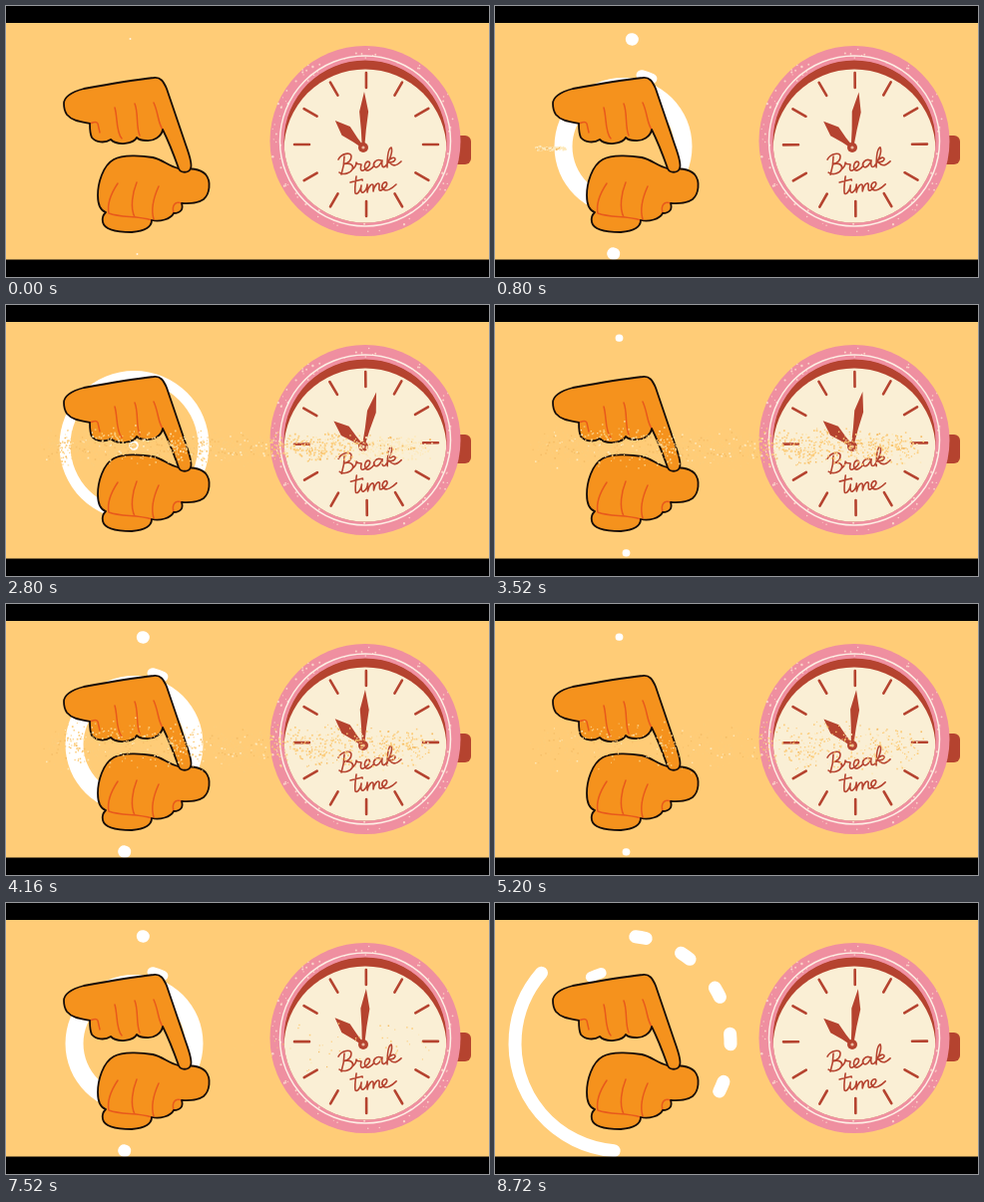
An HTML page with a canvas that plays this animation: 484x272 px, repeating every 8800 ms.

```html
<!DOCTYPE html>
<html lang="en">
<head>
<meta charset="utf-8">
<title>Break time</title>
<style>
html, body { margin: 0; width: 100%; height: 100%; overflow: hidden; background: #000; }
canvas { display: block; width: 484px; height: 272px; }
</style>
</head>
<body>
<canvas id="stage" width="484" height="272" role="img" aria-label="Break time"></canvas>
<script>
const ctx = document.getElementById('stage').getContext('2d');
const LOOP = 8800, STEP = 80, RING = 21, TAP = 750;
const BG = '#ffcc77', ORANGE = '#f5921d', INK = '#170d08', CREASE = '#e8591c';
const PINK = '#ef8fa0', RED = '#b5432f', CREAM = '#faefd5';
const TAU = Math.PI * 2;
const rad = d => d * Math.PI / 180;

// Seeded random numbers in 0..1
function seeded(s) {
  return () => {
    s = (s + 0x6D2B79F5) | 0;
    let v = Math.imul(s ^ (s >>> 15), 1 | s);
    v = (v + Math.imul(v ^ (v >>> 7), 61 | v)) ^ v;
    return ((v ^ (v >>> 14)) >>> 0) / 4294967296;
  };
}

// Value of a [position, value] table at x
function track(keys, x) {
  if (x <= keys[0][0]) return keys[0][1];
  for (let i = 1; i < keys.length; i++) {
    const [x0, v0] = keys[i - 1], [x1, v1] = keys[i];
    if (x <= x1) return v0 + (v1 - v0) * (x - x0) / (x1 - x0);
  }
  return keys[keys.length - 1][1];
}

const swing = [[0, 1], [.027, 3], [.213, 20.5], [.24, 17.5], [.5, 1], [.547, 2], [.627, 6], [.733, 13.5], [1, 1]];
const lift = [[.08, 0], [.213, .57], [.24, 1], [.34, 1], [.46, 0]];
const arcHead = [[2, 178], [3, 215], [4, 311], [5, 350], [6, 364.8]];
const arcTail = [[3, 178], [4, 184.7], [5, 200], [7, 258], [9, 350], [10, 364.8]];
const arcWidth = [[0, 1.4], [1, 2.5], [3, 12], [4, 13], [10, 12.5], [13, 0], [19, 0], [20, 1.4], [21, 1.4]];
const discEdge = [[5, 0], [7, 52], [10, 69], [14, 75], [18, 76]];
const holeEdge = [[6, 0], [10, 51], [14, 64], [18, 76]];

const upperHand = new Path2D(`M58 98 C58 90 67 86 78 83 C100 79 130 74 148 72
  C155 71 158 76 161 83 L180 139 C184 150 187 159 185 163 C183 168 175 168 173 163
  C168 149 162 134 157 124 C156 131 148 136 140 135 C136 135 133 134 131 132
  C128 138 112 141 105 134 C99 138 90 137 86 132 C84 128 84 122 84 118
  C74 116 66 115 61 109 C59 106 58 102 58 98 Z`);
const upperCrease = new Path2D(`M84 118 C88 116 91 116 92 118 L94 127
  M109 102 C112 112 110 126 116 133 M129 98 C133 108 130 121 134 130 M148 97 C153 108 152 117 157 124`);
const lowerHand = new Path2D(`M92 190 C92 178 97 160 108 154 C117 149 136 150 147 152
  C157 154 163 161 173 163 C185 163 194 163 200 169 C206 176 204 189 198 194
  C191 199 183 198 176 198 C178 204 175 208 168 208 C165 214 154 217 146 215
  C146 223 137 226 126 227 C115 227 99 226 97 217 C96 213 97 210 100 207
  C94 205 92 198 92 190 Z`);
const lowerCrease = new Path2D(`M112 178 C106 187 101 198 103 208 C116 213 130 210 146 215
  M131 177 C127 187 124 202 129 212 M153 181 C148 192 145 204 148 214 M176 198 C169 195 166 201 168 208`);

const lettering = new Path2D(`M339 151 C339 157 338 163 336 169
  M333 154 C336 148 346 146 346 151 C346 156 341 158 339 158.5 C345 157 349 160 347 164 C345 168 338 170 334 167
  M347 164 C350 162 351 159 351 157 C352 160 355 158 356 159 C355 163 355 166 358 165
  C362 163 366 159 364 156.5 C361 155 358 160 360 164 C362 167 367 163 369 160
  M376 155 C371 153 367 158 369 161 C372 164 376 158 377 155 C376 160 377 163 380 161
  C384 157 388 146 386 142 C383 143 382 154 382 162
  M382 157 C385 152 390 151 390 154 C389 157 385 157 384 157 C387 160 390 162 396 156
  M351 171 C350 178 349 184 350 188 C352 190 355 185 356 181 M345 177 L357 174
  M356 180 C355 185 356 188 358 187 C361 185 362 181 362 179 M357 175 l.3 0
  M362 179 L362 187 C363 181 367 177 368 180 L368 186 C369 180 373 176 374 179 C374 183 373 186 376 185
  C380 183 383 179 381 177 C378 176 375 181 378 184 C381 187 387 183 391 179`);
// Pointers are drawn upright with the pivot at 0,0
const minutePointer = new Path2D('M0 -56 L4.5 -36 L2.5 -18 L1.2 0 L-1.2 0 L-2.5 -18 L-4.5 -36 Z');
const hourPointer = new Path2D('M0 -39 L6 -24 L3 -11 L1.2 0 L-1.2 0 L-3 -11 L-6 -24 Z');

const rnd = seeded(11);
const specks = Array.from({ length: 80 }, () => {
  const a = rnd() * TAU, r = 83 + rnd() * 12;
  return [360 + Math.cos(a) * r, 135 + Math.sin(a) * r, .5 + rnd() * .7];
});
const dust = Array.from({ length: 1250 }, () => ({
  x: 40 + rnd() * 385,
  dx: rnd() + rnd() - 1,
  dy: (rnd() + rnd() + rnd()) * 2 / 3 - 1,
  life: 28 + rnd() * 53,
  size: 1.1 + rnd() * .9,
  tone: rnd()
}));

function disc(x, y, r, color) {
  ctx.fillStyle = color;
  ctx.beginPath();
  ctx.arc(x, y, r, 0, TAU);
  ctx.fill();
}

function line(path, color, width) {
  ctx.strokeStyle = color;
  ctx.lineWidth = width;
  ctx.stroke(path);
}

// White arc around the hands; angles run clockwise from the top
function arc(r, from, to, width) {
  ctx.strokeStyle = '#fff';
  ctx.lineWidth = width;
  ctx.beginPath();
  ctx.arc(128, 141, r, rad(from - 90), rad(Math.max(to, from + .3) - 90));
  ctx.stroke();
}

function drawRings(p) {
  const width = track(arcWidth, p);
  if (width > 0) {
    const tail = track(arcTail, p), head = track(arcHead, p);
    arc(108, tail, head, width);
    if (head - tail < 2) arc(108, tail - 180, head - 180, width);
    else for (let k = 0; k < 7; k++) {
      const mid = 9.6 + 26 * k;
      const a = Math.max(mid - 2.8, tail - 180), b = Math.min(mid + 2.8, head - 180);
      if (b > a) arc(108, a, b, width);
    }
  }
  if (p >= 4 && p <= 11) {
    const mid = 339 + (p - 4) * 6.7;
    arc(74, mid - 4.5, mid + 4, 10.5);
  }
  const outer = track(discEdge, p), inner = track(holeEdge, p);
  if (outer > inner && p < 18) {
    ctx.fillStyle = '#fff';
    ctx.beginPath();
    ctx.arc(128.5, 141, outer, 0, TAU);
    ctx.arc(128.5, 141, inner, 0, TAU, true);
    ctx.fill();
  }
  if (p >= 12 && p < 17) arc(p / 14 * 3.8, 0, 359.9, 2);
}

function drawHand(shape, crease) {
  ctx.fillStyle = ORANGE;
  ctx.fill(shape);
  line(crease, CREASE, 1.5);
  line(shape, INK, 1.8);
}

function drawHands(up) {
  drawHand(lowerHand, lowerCrease);
  ctx.save();
  ctx.translate(58 - 5 * up, 98 - 6 * up);
  ctx.rotate(rad(-9.8 * up));
  ctx.translate(-58, -98);
  drawHand(upperHand, upperCrease);
  ctx.restore();
}

function pointer(shape, angle) {
  ctx.save();
  ctx.translate(358, 142);
  ctx.rotate(rad(angle));
  ctx.fillStyle = RED;
  ctx.fill(shape);
  ctx.restore();
}

function drawClock(angle) {
  const sway = angle / 20;
  ctx.fillStyle = RED;
  ctx.beginPath();
  ctx.roundRect(440, 130, 26, 29, 6);
  ctx.fill();
  disc(360, 135.5, 95.5, PINK);
  for (const [x, y, r] of specks) disc(x, y, r, '#fbd3c8');
  ctx.strokeStyle = '#fdeee4';
  ctx.lineWidth = 1.5;
  ctx.beginPath();
  ctx.arc(360, 135.5, 85.5, 0, TAU);
  ctx.stroke();

  ctx.save();
  ctx.beginPath();
  ctx.arc(360, 136, 81.5, 0, TAU);
  ctx.clip();
  disc(360, 136, 82, RED);
  disc(360, 145, 81.5, CREAM);
  ctx.restore();

  ctx.save();
  ctx.translate(361, 139);
  ctx.rotate(rad(-.9 * sway));
  ctx.strokeStyle = RED;
  ctx.lineWidth = 2.6;
  ctx.beginPath();
  for (let i = 0; i < 12; i++) {
    const c = Math.cos(i * TAU / 12), s = Math.sin(i * TAU / 12);
    ctx.moveTo(c * 57, s * 57);
    ctx.lineTo(c * 72, s * 72);
  }
  ctx.stroke();
  ctx.translate(-361, -139);
  line(lettering, RED, 1.6);
  ctx.restore();

  pointer(hourPointer, -46 - 5 * sway);
  pointer(minutePointer, angle);
  disc(358, 142, 5, RED);
  disc(358, 142, 1.6, '#e9b9a0');
}

// A streak runs to the right, then its grains drift apart and die
function drawDust(f) {
  for (const d of dust) {
    const age = f - 9 - (d.x - 40) / 31;
    if (age < 0 || age > d.life) continue;
    const spread = 2 + 36 * (1 - Math.exp(-age / 26));
    const x = d.x + d.dx * Math.min(10, age * .5);
    const y = 143 + d.dy * spread;
    const pale = age < 16 ? .8 : .12;
    ctx.fillStyle = d.tone < pale ? '#fde9bb' : d.tone < .85 ? '#fccd7c' : '#f5bd66';
    const size = d.size * (1 - .25 * age / 80);
    ctx.fillRect(x - size / 2, y - size / 2, size, size);
  }
}

function draw(f) {
  const beat = f * STEP % TAP / TAP;
  ctx.fillStyle = BG;
  ctx.fillRect(0, 0, 484, 272);
  ctx.lineCap = ctx.lineJoin = 'round';
  drawRings(f % RING);
  drawHands(track(lift, beat));
  drawClock(track(swing, beat));
  drawDust(f);
  ctx.fillStyle = '#000';
  ctx.fillRect(0, 0, 484, 17);
  ctx.fillRect(0, 254.5, 484, 18);
}

function tick() {
  draw(Math.floor(performance.now() % LOOP / STEP));
  requestAnimationFrame(tick);
}
tick();
</script>
</body>
</html>
```
